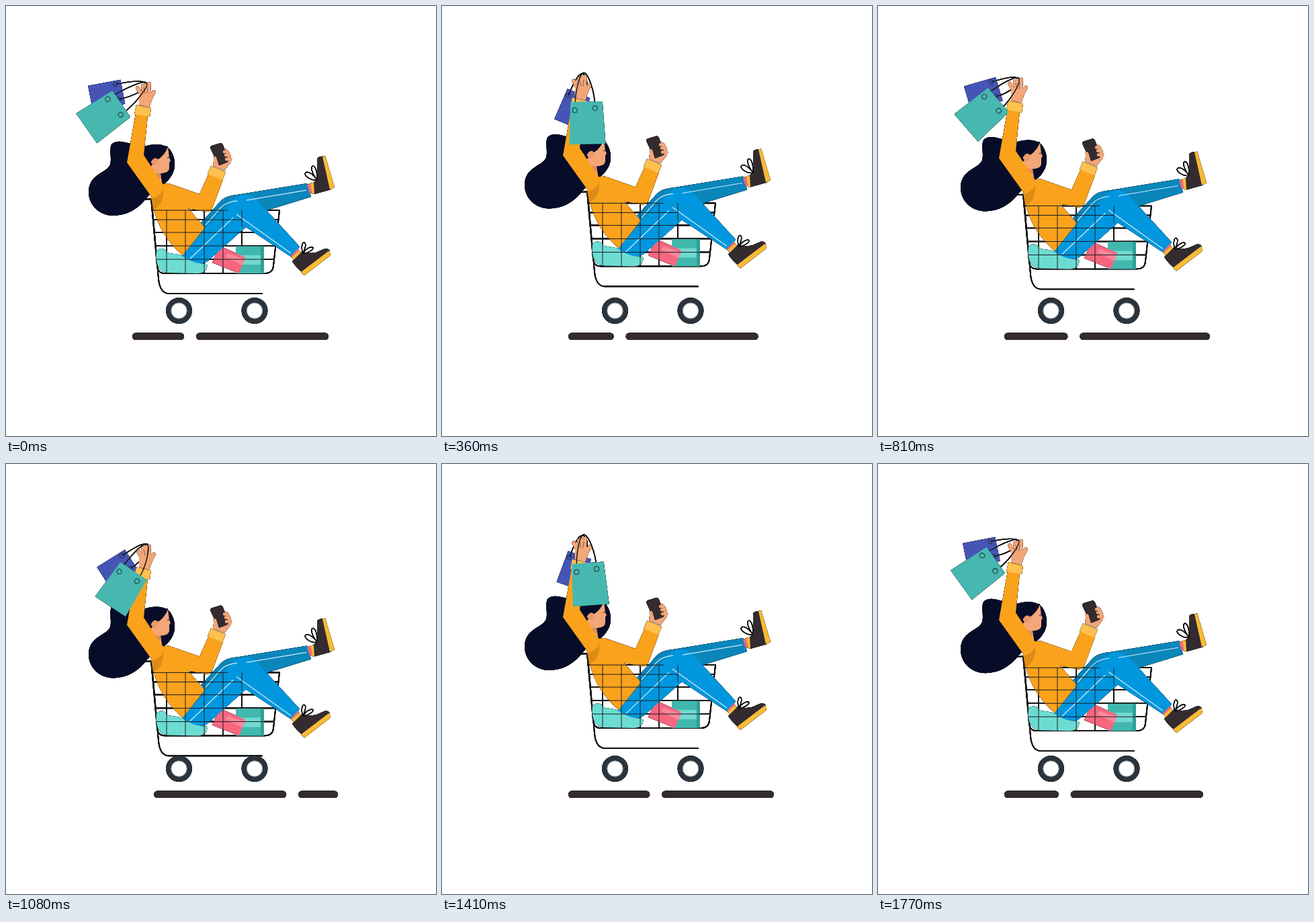
Write an HTML page that moves like this. It is 640 px wide and 640 px high and loops after 1800 ms.

```html
<!DOCTYPE html>
<html lang="en">
<head>
<meta charset="utf-8">
<title>Cart ride</title>
<style>
  html, body { margin: 0; width: 100%; height: 100%; overflow: hidden; background: #fff; }
  svg { display: block; width: 100vw; height: 100vh; }
  .edge { filter: drop-shadow(0 0 .4px #000) drop-shadow(0 0 .3px #000); }
  .line { fill: none; stroke: #111; stroke-width: 1.7; stroke-linecap: round; stroke-linejoin: round; }
  .lace { stroke-width: 1.3; }
  .thin { fill: none; stroke: #1c1c22; stroke-width: 1; }
  .seam { fill: none; stroke: #cdebfb; stroke-width: 1.2; }
  .hair { fill: #070d28; }
  .skin { fill: #f4a678; }
  .finger { fill: none; stroke: #f4a678; stroke-width: 5.6; stroke-linecap: round; }
  .knit { fill: #faa21b; }
  .cuff { fill: #ffc04f; }
  .dark { fill: #342b30; }
  .sole { fill: #f9bb33; }
  .pink { fill: #f7667f; }
  .far { fill: #0a86bb; }
  .near { fill: #0097de; }
  .strap { fill: none; stroke: #111; stroke-width: 1.4; }
  .hole { fill: none; stroke: #20333c; stroke-width: 1; }
</style>
</head>
<body>
<svg viewBox="0 0 640 640">
  <g class="edge">
    <rect class="dark floor" y="486.5" height="10.4" rx="5.2"/>
    <rect class="dark floor" y="486.5" height="10.4" rx="5.2"/>

    <g id="ride">
      <g id="backBag">
        <path fill="#4655b5" d="M-18-24.500H18.500L19 24.500H-18.500Z"/>
        <circle class="hole" cx="-13" cy="-16" r="3.300"/>
        <circle class="hole" cx="10" cy="-16" r="3.300"/>
      </g>
      <path id="backStrap" class="strap"/>

      <!-- head -->
      <path class="hair" d="M157 206C163 200 172 201 182 204L206 209C222 204 238 205 245 215C253 227 253 243 246 253Q240 263 230 268L215 279C204 292 191 311 160 312C138 312 122 295 123 275C125 249 150 249 155 236C158 227 153 215 157 206Z"/>
      <path class="skin" d="M241 210L243 226L245 230L243 233V241C243 247 236 249 230 249L233 268L213 260L216 238L226 228Q236 221 241 210Z"/>
      <path fill="#dc8c62" d="M216 246Q222 249 230 249L231 257Q221 254 215 249Z"/>
      <circle cx="221" cy="231" r="5.500" fill="#e89a6d"/>
      <path class="hair" d="M214 222Q228 207 241 209Q237 221 227 228Q220 222 214 235Z"/>
      <path class="thin" d="M240 226l4-1"/>

      <!-- cart, behind -->
      <path class="line" d="M200 288L216 287L225 387Q226 398 236 398H385Q397 398 398 387L407 304H217M218 304L227 406Q229 428 243 428H381"/>
      <path class="line" d="M219 318H405M221 337H403M222 357H401M224 377H399M239 304V398M267 304V398M295 304V398M323 304V398M351 304V398"/>

      <!-- boxes in the cart -->
      <path fill="#41b8ae" d="M342 357H384V398H342Z"/>
      <path fill="#70d9d0" d="M342 371H379V385H342Z"/>
      <path fill="#2f9f97" d="M379 357H384V398H379Z"/>
      <path class="pink" d="M318 357L356 374L347 398L307 382Z"/>
      <path fill="#fa8799" d="M330 368L356 377L352 386L326 373Z"/>

      <!-- legs -->
      <path class="far" d="M288 325L318 292C326 282 338 282 350 280L448 264L454 284L350 316L300 345Z"/>
      <path class="near" d="M262 372L296 331L331 296C342 281 359 276 372 287L437 358L427 375L357 329L301 379C292 387 272 384 262 372Z"/>
      <path class="far" d="M289 325L319 291Q331 281 343 282Q326 296 306 318L296 331Z"/>
      <path class="seam" d="M273 377L338 315M343 310L424 368M297 326L316 304Q326 291 344 290M358 289L447 274"/>
      <path fill="#6cdcd3" d="M224 365C229 359 237 360 240 367C249 370 258 368 265 374C274 380 286 384 299 384C301 393 294 398 285 398L240 397C227 396 222 382 224 365Z"/>

      <!-- far shoe -->
      <path class="pink" d="M448 266L454 264L457 278L452 279Z"/>
      <path class="sole" d="M453 264L461 262L464 278L456 280Z"/>
      <path class="dark" d="M463 227Q467 223 473 224L484 273L459 280L458 263Q466 256 463 240Z"/>
      <path class="sole" d="M471 224L475 223L489 270L482 273Z"/>
      <path class="line lace" d="M463 259C452 260 442 251 446 248S459 252 463 259C454 247 453 238 457 238S464 250 463 259"/>

      <!-- near shoe -->
      <path class="pink" d="M424 372L434 361L437 365L428 376Z"/>
      <path class="sole" d="M425 374L436 364L442 371L431 381Z"/>
      <path class="dark" d="M426 380Q433 373 440 366Q450 369 461 367L475 361Q482 361 482 366L442 397Q433 391 426 380Z"/>
      <path class="sole" d="M439 396L481 364L483 371L444 401Z"/>
      <path class="line lace" d="M442 369C438 357 442 349 445 353S443 364 442 369C447 359 457 357 457 360S449 368 442 369"/>

      <!-- body and front arm -->
      <path class="knit" d="M216 283L213 264L233 265L242 264L288 280L302 249L323 258L307 301Q304 307 296 306L271 301L296 330L263 371C239 350 222 325 216 283Z"/>
      <path fill="#dd8b16" d="M215 278L234 272Q236 296 219 303Z"/>
      <path class="skin" d="M308 238L310 224L318 212Q325 210 331 216Q336 223 335 232L325 245Z"/>
      <path class="dark" d="M304 211Q304 209 306 208L319 204Q322 204 323 207L331 228Q332 231 329 233L319 237Q316 238 315 235Z"/>
      <path class="finger" style="stroke-width:4.500" d="M325 217l4 0M327 222l5 0M328 228l6 0M311 226l3 10"/>
      <path class="cuff" d="M305 238L327 247L322 259L300 250Z"/>

      <!-- raised arm -->
      <path class="finger" d="M203 135L196 122M206 132L204 119M209 132L209 117M212 132L213 116M213 141L220 128"/>
      <path class="skin" d="M198 129L214 127L220 132L213 151L198 147Z"/>
      <path class="thin" stroke-opacity=".5" d="M205 121l2 9M211 120l-1 10"/>
      <path class="knit" d="M193 160L211 163L205 222L234 266Q236 280 218 286L180 233Z"/>
      <path class="cuff" d="M194 147L216 152L214 165L191 161Z"/>

      <!-- cart, in front -->
      <path class="thin" d="M217 304H330M219 318H351M221 337H351M222 357H401M224 377H399M239 304V398M267 304V398M295 304V398M323 304V398M351 304V330"/>

      <path id="frontStrap" class="strap"/>
      <g id="frontBag">
        <path fill="#47b8b0" d="M-24-31.500L23.500-32L28 31L-26 32Z"/>
        <circle class="hole" cx="-17.500" cy="-19" r="3.600"/>
        <circle class="hole" cx="12.500" cy="-22" r="3.600"/>
      </g>
    </g>

    <g fill="#fff" stroke="#2b343c" stroke-width="7.500">
      <circle cx="257.500" cy="453.500" r="15.600"/>
      <circle cx="370" cy="453.500" r="15.600"/>
    </g>
    <g fill="none" stroke="#8d969c" stroke-width="1">
      <circle cx="257.500" cy="453.500" r="11.600"/>
      <circle cx="370" cy="453.500" r="11.600"/>
    </g>
  </g>
</svg>
<script>
const $ = id => document.getElementById(id);
const bars = document.querySelectorAll('.floor');
const PERIOD = 900, RAD = Math.PI / 180;

// Evenly spaced keys over one period
const bobKeys = [0, 2.5, 6, 6.5, 0, -7, -10.5, -10.5, -7.5, -2, 5, 5.8, -3, -10, -2.2];
const floorKeys = [265, 290, 370, 417, 395, 310, 256, 258, 285, 335, 388, 403, 345, 292, 278];

// Smooth closed curve through the keys
function curve(keys, t) {
  const n = keys.length, p = t / PERIOD * n, i = Math.floor(p), u = p - i;
  const [a, b, c, d] = [-1, 0, 1, 2].map(k => keys[(i + k + n) % n]);
  return b + u / 2 * (c - a + u * (2 * a - 5 * b + 4 * c - d + u * (3 * (b - c) + d - a)));
}

// Places a bag on its orbit round the hand and draws its strap
function hang(name, turn, orbit, radius, holes) {
  const cx = 209 - radius * Math.sin(orbit * RAD);
  const cy = 121 + radius * Math.cos(orbit * RAD);
  const c = Math.cos(turn * RAD), s = Math.sin(turn * RAD);
  const at = (x, y) => `${cx + x * c - y * s} ${cy + x * s + y * c}`;
  const [[x1, y1], [x2, y2]] = holes;
  const px = 211 - turn * .03, py = 110 + Math.max(0, turn) * .08;
  $(name + 'Bag').setAttribute('transform', `translate(${cx} ${cy}) rotate(${turn})`);
  $(name + 'Strap').setAttribute('d',
    `M${at(x1, y1)}C${at(x1, y1 - 28)} ${px - 6 * c} ${py - 6 * s} ${px} ${py}` +
    `C${px + 6 * c} ${py + 6 * s} ${at(x2, y2 - 26)} ${at(x2, y2)}`);
}

function draw(now) {
  const t = now % PERIOD;
  $('ride').setAttribute('transform', `translate(0 ${curve(bobKeys, t)})`);

  // The bags are flung outward at the top of the swing
  const swing = 25 + 31 * Math.cos(2 * Math.PI * t / PERIOD);
  const fling = 5 * Math.exp(-Math.min(t, PERIOD - t) / 15);
  hang('back', swing + 23, 1.06 * swing + 20, 45 + .19 * swing + fling, [[-13, -16], [10, -16]]);
  hang('front', swing, 1.1 * swing - 5.5, 64 + .14 * swing + fling, [[-17.5, -19], [12.5, -22]]);

  const end = curve(floorKeys, t);
  [end - 197, end + 18].forEach((x, i) => {
    const left = Math.max(188, x), right = Math.min(494, x + 197);
    bars[i].setAttribute('x', left);
    bars[i].setAttribute('width', Math.max(0, right - left));
  });
}

const start = performance.now();
function tick() {
  draw(performance.now() - start);
  requestAnimationFrame(tick);
}
tick();
</script>
</body>
</html>
```
